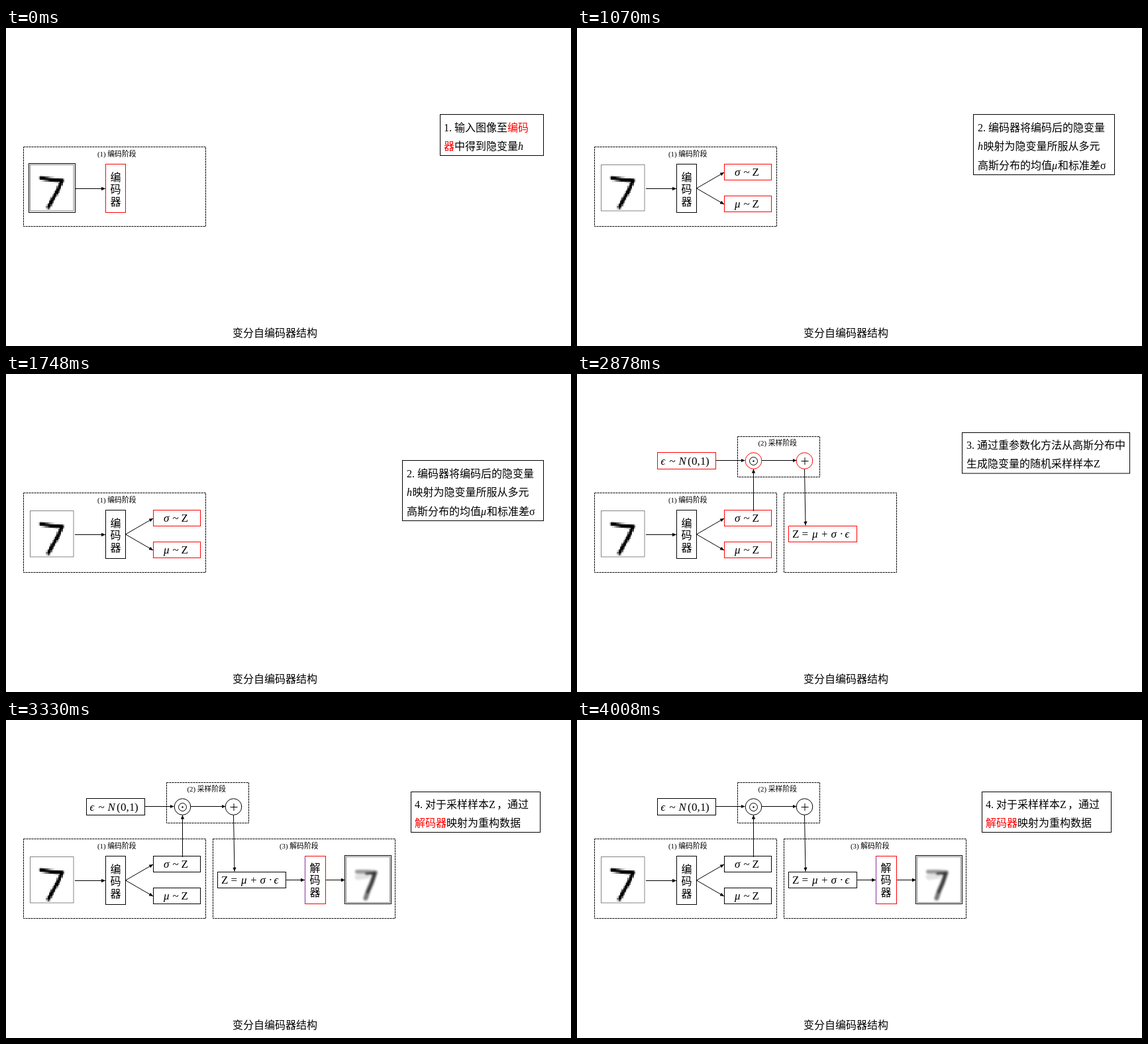
These frames come from a looping animation (853 by 480 pixels, 4460 ms). An HTML page:

```html
<!DOCTYPE html>
<html lang="zh-CN">
<head>
<meta charset="utf-8">
<title>变分自编码器结构</title>
<style>
html, body { margin: 0; width: 100%; height: 100%; overflow: hidden; background: #fff; }
svg { display: block; width: 853px; height: 480px; }
text { font: 16px "Liberation Serif", "Noto Sans CJK SC", "Noto Sans CJK", "Noto Serif", sans-serif; fill: #000; white-space: pre; }
.label text { font-size: 10.8px; }
.mid text { text-anchor: middle; }
.math text { font-family: "Liberation Serif", "Noto Serif", serif; font-size: 17px; }
i, .it, .math .it { font-style: italic; }
.red { fill: #f00; }
.box rect, .box circle, .wire path { fill: none; stroke: #000; }
.wire path { marker-end: url(#tip); }
.dash rect { stroke-dasharray: 3 1; }
.box .frame { stroke: #858585; }
.box .edge { stroke: #f00; }

/* steps change at 1070, 2200 and 3330 of 4460 ms */
.at0, .at1, .at2, .at3, .from1, .from2, .hot rect, .hot circle, .box .first {
  animation: 4460ms step-end infinite;
}
.at0 { animation-name: at0; }
.at1 { animation-name: at1; }
.at2 { animation-name: at2; }
.at3 { animation-name: at3; }
.from1 { animation-name: from1; }
.from2 { animation-name: from2; }
.hot rect, .hot circle { animation-name: cool; }
.box .first { animation-name: coolFirst; }
@keyframes at0 { 0% { visibility: visible } 23.991%, 100% { visibility: hidden } }
@keyframes at1 { 0% { visibility: hidden } 23.991% { visibility: visible } 49.3274%, 100% { visibility: hidden } }
@keyframes at2 { 0% { visibility: hidden } 49.3274% { visibility: visible } 74.6637%, 100% { visibility: hidden } }
@keyframes at3 { 0% { visibility: hidden } 74.6637%, 100% { visibility: visible } }
@keyframes from1 { 0% { visibility: hidden } 23.991%, 100% { visibility: visible } }
@keyframes from2 { 0% { visibility: hidden } 49.3274%, 100% { visibility: visible } }
@keyframes cool { 0% { stroke: #f00 } 74.6637%, 100% { stroke: #000 } }
@keyframes coolFirst { 0% { stroke: #f00 } 23.991%, 100% { stroke: #000 } }
</style>
</head>
<body>
<svg viewBox="0 0 853 480">
  <defs>
    <marker id="tip" markerUnits="userSpaceOnUse" markerWidth="7" markerHeight="6" refX="6" refY="3" orient="auto">
      <path d="M0 .3L6 3L0 5.7z"/>
    </marker>
    <filter id="soft" x="-40%" y="-40%" width="180%" height="180%"><feGaussianBlur stdDeviation="1.7"/></filter>
  </defs>

  <text x="342" y="466">变分自编码器结构</text>

  <!-- encoder stage -->
  <g class="box dash"><rect x="26.5" y="179.5" width="275" height="120"/></g>
  <g class="label"><text x="138" y="194">(1) 编码阶段</text></g>
  <g id="digit" shape-rendering="crispEdges"></g>
  <g class="box">
    <rect class="frame" x="36.5" y="206.5" width="65.5" height="69.5"/>
    <rect class="at0" x="34.5" y="204.5" width="70" height="74"/>
    <rect class="first" x="150.5" y="205.5" width="30" height="73"/>
  </g>
  <g class="wire"><path d="M104 242.5H150"/></g>
  <g class="mid"><text x="165.5" y="230.5">编</text><text x="165.5" y="249">码</text><text x="165.5" y="267.5">器</text></g>

  <g class="from1">
    <g class="wire"><path d="M180.5 242L222 218"/><path d="M180.5 242L222 266"/></g>
    <g class="box hot">
      <rect x="222.5" y="205.5" width="71" height="24"/>
      <rect x="222.5" y="253.5" width="71" height="24"/>
    </g>
    <g class="math">
      <text class="it" x="238" y="223">σ</text><text x="251.5" y="223">~</text><text x="264.5" y="223">Z</text>
      <text class="it" x="238" y="271">μ</text><text x="251.5" y="271">~</text><text x="264.5" y="271">Z</text>
    </g>
  </g>

  <!-- sampling stage -->
  <g class="from2">
    <g class="box dash"><rect x="242.5" y="94.5" width="124" height="61"/></g>
    <g class="label"><text x="273.5" y="108">(2) 采样阶段</text></g>
    <g class="box hot">
      <rect x="121.5" y="118.5" width="88" height="25"/>
      <circle cx="266.5" cy="131" r="12.3"/>
      <circle cx="343.5" cy="131" r="12.3"/>
      <rect x="319.5" y="229.5" width="103" height="24"/>
    </g>
    <g class="box"><circle cx="266.5" cy="131.5" r="6"/></g>
    <circle cx="266.5" cy="131.5" r="1.2"/>
    <path d="M338.5 131.5H349.5M344 126V137" stroke="#000"/>
    <g class="wire">
      <path d="M210 130.5H253.5"/>
      <path d="M279 130.5H331.5"/>
      <path d="M266.5 207V143.5"/>
      <path d="M343.5 143.5L345 228.5"/>
    </g>
    <g class="math">
      <text class="it" x="126.5" y="136.5">ϵ</text><text x="139.5" y="136.5">~</text><text class="it" x="153.5" y="136.5">N</text>
      <text x="167" y="136.5">(</text><text x="173" y="136.5">0,</text><text x="186" y="136.5">1</text><text x="194" y="136.5">)</text>
      <text x="325" y="247">Z</text><text x="339.5" y="247">=</text><text class="it" x="355" y="247">μ</text>
      <text x="369" y="247">+</text><text class="it" x="383.5" y="247">σ</text><text x="396.5" y="247">·</text><text class="it" x="404.5" y="247">ϵ</text>
    </g>
  </g>

  <!-- decoder stage -->
  <g class="box dash">
    <rect class="at2" x="312.5" y="179.5" width="170" height="120"/>
    <rect class="at3" x="312.5" y="179.5" width="275" height="120"/>
  </g>
  <g class="at3">
    <g class="label"><text x="413" y="194">(3) 解码阶段</text></g>
    <g class="wire"><path d="M423 241.5H451"/><path d="M483 241.5H512"/></g>
    <g class="box">
      <rect class="edge" x="451.5" y="205.5" width="31" height="72"/>
      <rect x="511.5" y="204.5" width="70" height="73"/>
      <rect class="frame" x="513.5" y="206.5" width="66" height="69"/>
    </g>
    <path d="M451.5 205V278" stroke="#8a2ea0"/>
    <g class="mid"><text x="466.5" y="229">解</text><text x="466.5" y="247">码</text><text x="466.5" y="266">器</text></g>
    <g filter="url(#soft)" fill="none" stroke-linecap="round" stroke-linejoin="round">
      <path d="M531 237L545 235" stroke="#e2e2e2" stroke-width="9"/>
      <path d="M530 229L545 229L558 230" stroke="#999" stroke-width="6"/>
      <path d="M557 231L552 246L547 257L543 269" stroke="#777" stroke-width="7"/>
      <path d="M544 232L557 231L552 246L546 260" stroke="#333" stroke-width="4"/>
    </g>
  </g>

  <!-- notes -->
  <g class="at0">
    <g class="box"><rect x="655.5" y="130.5" width="156" height="62"/></g>
    <text x="661" y="156">1. 输入图像至<tspan class="red">编码</tspan></text>
    <text x="661" y="184"><tspan class="red">器</tspan>中得到隐变量<tspan class="it">h</tspan></text>
  </g>
  <g class="at1">
    <g class="box"><rect x="598.5" y="130.5" width="213" height="91"/></g>
    <text x="605" y="156">2. 编码器将编码后的隐变量</text>
    <text x="605" y="184"><tspan class="it">h</tspan><tspan x="613.5">映射为隐变量所服从多元</tspan></text>
    <text x="605" y="213">高斯分布的均值<tspan class="it">μ</tspan><tspan x="726">和标准差σ</tspan></text>
  </g>
  <g class="at2">
    <g class="box"><rect x="581.5" y="88.5" width="253" height="61.5"/></g>
    <text x="588" y="113">3. 通过重参数化方法从高斯分布中</text>
    <text x="588" y="141">生成隐变量的随机采样样本Z</text>
  </g>
  <g class="at3">
    <g class="box"><rect x="611.5" y="108.5" width="195" height="61"/></g>
    <text x="617" y="133">4. 对于采样样本Z<tspan x="741">，通过</tspan></text>
    <text x="617" y="161"><tspan class="red">解码器</tspan>映射为重构数据</text>
  </g>
</svg>
<script>
// Handwritten seven on a 28 x 28 grid, shaded by distance to its stroke
const stroke = [[53, 226.5], [69, 229], [84.5, 230], [78, 246], [70, 259], [64, 270]];
const cell = { w: 65 / 28, h: 69 / 28 };

function segDist(x, y, [ax, ay], [bx, by]) {
  const dx = bx - ax, dy = by - ay;
  const t = Math.max(0, Math.min(1, ((x - ax) * dx + (y - ay) * dy) / (dx * dx + dy * dy)));
  return Math.hypot(x - ax - t * dx, y - ay - t * dy);
}

const digit = document.getElementById("digit");
for (let r = 0; r < 28; r++) {
  for (let c = 0; c < 28; c++) {
    const x = 37 + c * cell.w, y = 207 + r * cell.h;
    const cx = x + cell.w / 2, cy = y + cell.h / 2;
    const d = Math.min(...stroke.slice(1).map((p, i) => segDist(cx, cy, stroke[i], p)));
    const ink = Math.max(0, Math.min(1, (4 - d) / 2.4));
    if (ink < 0.05) continue;
    const g = Math.round(255 * (1 - ink));
    const px = document.createElementNS("http://www.w3.org/2000/svg", "rect");
    const attrs = { x, y, width: cell.w, height: cell.h, fill: `rgb(${g},${g},${g})` };
    for (const k in attrs) px.setAttribute(k, attrs[k]);
    digit.append(px);
  }
}
</script>
</body>
</html>
```
